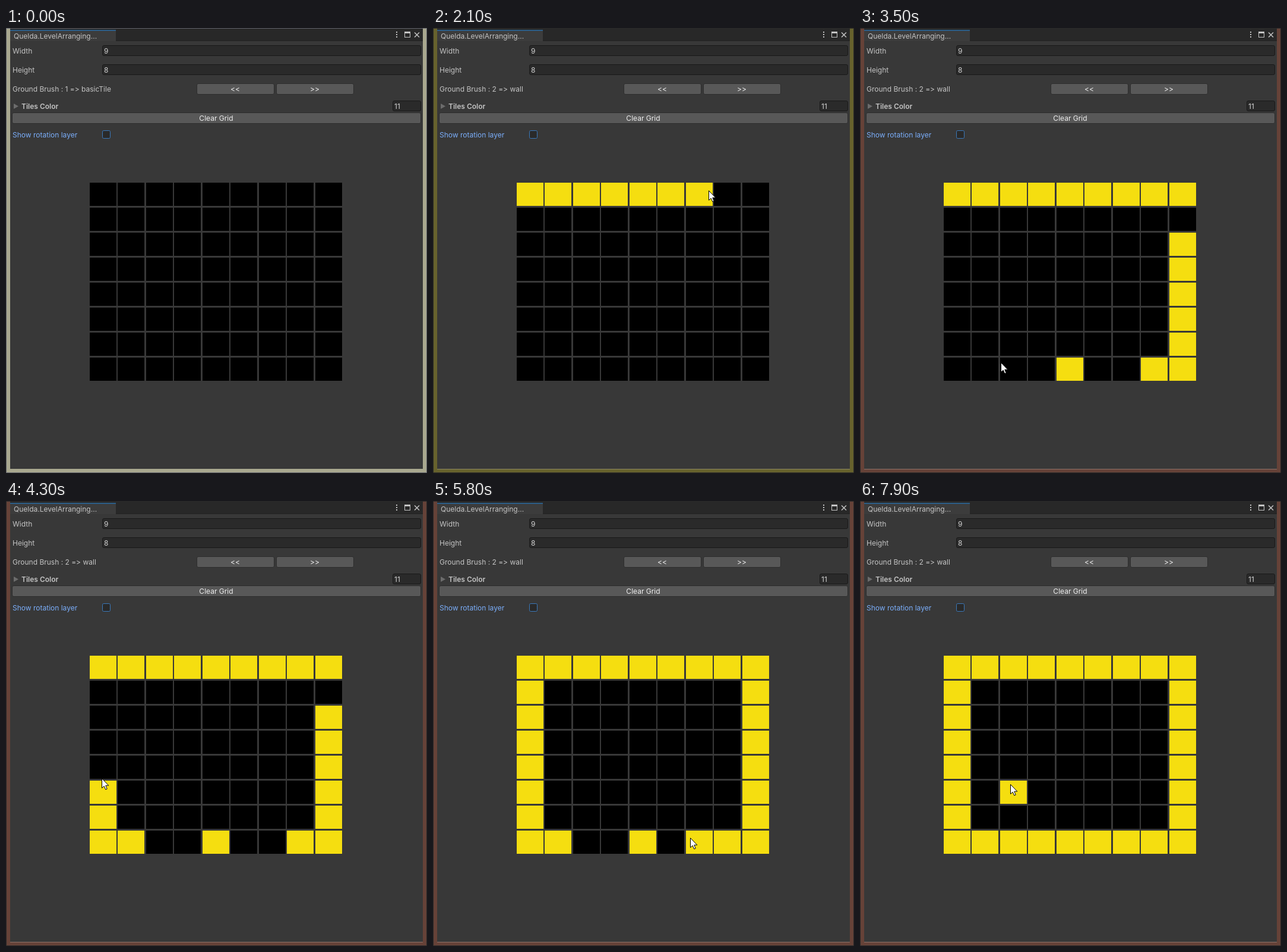
Recreate the animation shown at these times as an HTML page. Size 709 px wide and 748 px high, loop 8000 ms.

```html
<!DOCTYPE html>
<html lang="en">
<head>
<meta charset="utf-8">
<title>Board editor</title>
<style>
  html, body { margin: 0; width: 100%; height: 100%; overflow: hidden; background: #383838; }
  svg { display: block; width: 709px; height: 748px; }
  text { font: 12px Inter, Roboto, sans-serif; font-variant-ligatures: none; fill: #c4c4c4; }
  .value { fill: #d2d2d2; }
  .mid { fill: #eee; text-anchor: middle; }
  .field { fill: #2a2a2a; stroke: #191919; }
  .button { fill: #585858; stroke: #2d2d2d; }
</style>
</head>
<body>
<svg viewBox="0 0 709 748">
  <rect id="edge" width="709" height="748"/>
  <rect id="frame" x="1" y="1" width="707" height="746"/>
  <rect id="line" x="7" y="741" width="695" height="1"/>
  <rect x="7" y="1" width="695" height="740" fill="#383838"/>
  <rect x="7" y="1" width="695" height="21" fill="#282828"/>
  <rect x="7" y="21" width="695" height="1" fill="#222"/>
  <rect x="7" y="3" width="178" height="19" fill="#3c3c3c"/>
  <rect x="7" y="3" width="178" height="2" fill="#2c5d87"/>
  <text x="13" y="18">Quelda.LevelArranging...</text>

  <g fill="#c4c4c4">
    <path d="M657 6h2v2h-2zm0 4h2v2h-2zm0 4h2v2h-2z"/>
    <path d="M671 6h10v10h-10zm1 3v6h8v-6z" fill-rule="evenodd"/>
    <path d="M688 7.5l8 8m0-8l-8 8" stroke="#c4c4c4" stroke-width="1.5"/>
    <path d="M13 127l8 4.5-8 4.5z" fill="#6c6c6c"/>
  </g>

  <g class="field">
    <rect x="162.5" y="29.5" width="536" height="17" rx="2.5"/>
    <rect id="height" x="162.5" y="61.5" width="536" height="17" rx="2.5"/>
    <rect x="651.5" y="122.5" width="47" height="17" rx="2.5"/>
    <rect x="162.5" y="172.5" width="13" height="13" rx="2" style="stroke:#3a79bb"/>
  </g>
  <g class="button">
    <rect x="321.5" y="93.5" width="130" height="18" rx="2.5"/>
    <rect x="455.5" y="93.5" width="130" height="18" rx="2.5"/>
    <rect x="10.5" y="142.5" width="688" height="18" rx="2.5"/>
  </g>

  <text x="11" y="43">Width</text>
  <text x="165" y="43" class="value">9</text>
  <text x="11" y="75">Height</text>
  <text x="165" y="75" class="value">8</text>
  <text x="11" y="107" id="brush"></text>
  <text x="386" y="107" class="mid">&lt;&lt;</text>
  <text x="520" y="107" class="mid">&gt;&gt;</text>
  <text x="26" y="136" style="font-weight:600">Tiles Color</text>
  <text x="654" y="136" class="value">11</text>
  <text x="354" y="156" class="mid">Clear Grid</text>
  <text x="11" y="184" style="fill:#7baefa">Show rotation layer</text>

  <g id="grid"></g>
  <path id="cursor" d="M.5 .5V16.5L4.2 13.2 6.8 19 9.2 18 6.8 12.2H11.8Z" fill="#fff" stroke="#000"/>
</svg>
<script>
const LOOP = 8000, COLS = 9, ROWS = 8;
const LEFT = 141, TOP = 260, CELL_W = 47.5, CELL_H = 42;
const $ = id => document.getElementById(id);
const set = (el, attrs) => { for (const name in attrs) el.setAttribute(name, attrs[name]); };

// Pointer route: time, x, y, and how many times the brush dabs on the way to the next point
const route = [
  [200, 157, 144], [700, 472, 95], [900, 472, 95], [1200, 178, 287],
  [1500, 174, 292, 8], [2190, 508, 270],                        // top row
  [2300, 517, 269], [2400, 517, 269], [2450, 530, 280, 1],
  [2620, 563, 358, 6], [3095, 525, 565], [3200, 525, 565],      // right column
  [3250, 490, 565, 2], [3350, 350, 563], [3500, 237, 562],      // bottom row
  [3650, 210, 565, 2], [3780, 165, 566],
  [4050, 160, 513, 1], [4200, 160, 513, 6], [4600, 162, 325],   // left column
  [4900, 520, 311], [5100, 525, 313, 1], [5300, 526, 317],      // missed tiles
  [5750, 450, 565, 2], [5900, 400, 568],
  [6150, 256, 566, 2], [6250, 300, 561], [6400, 300, 561],
  [6500, 396, 479], [6800, 400, 70], [7000, 396, 66],
  [7300, 280, 406], [7400, 260, 444], [7500, 260, 444],
  [7750, 253, 476, 1], [LOOP, 253, 476]
];

const looks = [
  { from: 0, edge: "#5f616a", frame: "#a9a88f", line: "#a9a88f" },
  { from: 900, edge: "#2a2a2a", frame: "#67622d", line: "#8a8660" },
  { from: 3000, edge: "#2a2a2a", frame: "#664238", line: "#8c7068" }
];

const tiles = [];
for (let i = 0; i < COLS * ROWS; i++) {
  const el = document.createElementNS("http://www.w3.org/2000/svg", "rect");
  set(el, {
    x: LEFT + Math.floor(i % COLS * CELL_W),
    y: TOP + Math.floor(i / COLS) * CELL_H,
    width: 45, height: 39
  });
  tiles.push({ el: $("grid").appendChild(el), at: Infinity });
}

const between = (a, b, k) => a.slice(0, 3).map((v, i) => v + (b[i] - v) * k);

// Each dab colours the tile under the pointer
route.forEach((point, n) => {
  const dabs = point[3] || 0;
  for (let i = 0; i < dabs; i++) {
    const [at, x, y] = between(point, route[n + 1], i / Math.max(dabs - 1, 1));
    const tile = tiles[Math.floor((y - TOP) / CELL_H) * COLS + Math.floor((x - LEFT) / CELL_W)];
    tile.at = Math.min(tile.at, at);
  }
});

function pointer(t) {
  const n = route.findIndex(p => p[0] > t);
  const a = route[n - 1], b = route[n];
  return between(a, b, (t - a[0]) / (b[0] - a[0])).slice(1).map(Math.round);
}

function draw(t) {
  const look = looks.filter(l => l.from <= t).pop();
  for (const id of ["edge", "frame", "line"]) set($(id), { fill: look[id] });
  $("brush").textContent = "Ground Brush : " + (t < 1000 ? "1 => basicTile" : "2 => wall");
  for (const { el, at } of tiles) set(el, { fill: t > at ? "#f5de10" : "#000" });

  const shown = t >= route[0][0];
  const [x, y] = shown ? pointer(t) : [0, 0];
  set($("cursor"), { visibility: shown ? "visible" : "hidden", transform: `translate(${x} ${y})` });
  $("height").style.stroke = x > 162 && y > 61 && y < 79 ? "#656565" : "";
}

// The screen refreshes ten times a second
const begin = performance.now();
function tick() {
  draw(Math.floor((performance.now() - begin) % LOOP / 100) * 100);
  requestAnimationFrame(tick);
}
tick();
</script>
</body>
</html>
```
